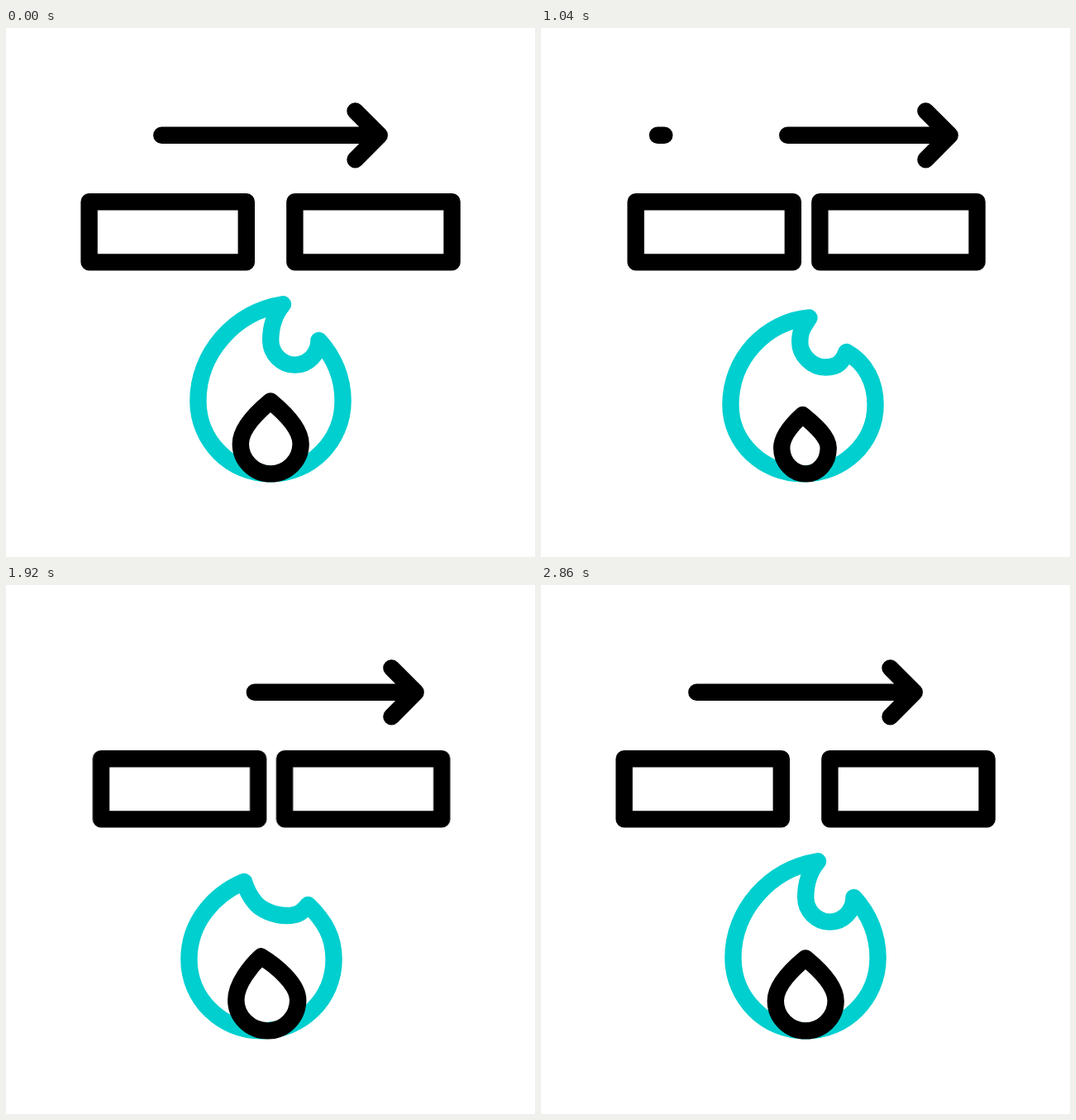
Write an HTML page that moves like this. It is 640 px wide and 640 px high and loops after 3600 ms.

```html
<!DOCTYPE html>
<html lang="en">
<head>
<meta charset="utf-8">
<title>Heat expansion</title>
<style>
  html, body { margin: 0; width: 100%; height: 100%; overflow: hidden; background: #fff; }
  svg { display: block; width: 100vw; height: 100vh; }
  svg * {
    fill: none; stroke: #000; stroke-width: 20.4;
    stroke-linecap: round; stroke-linejoin: round;
  }
  #flame { stroke: #00cfcf; }

  .left, .right, .arrow { animation: 3.6s cubic-bezier(.333, 0, .667, 1) infinite; }
  .left { --shift: 18px; animation-name: slide; }
  .right { --shift: -15.5px; animation-name: slide; }
  .arrow { animation-name: shorten; }
  .dashes { stroke-dasharray: 19 48 19 1000; animation: dashes 3.6s linear infinite; }

  @keyframes slide {
    0%, 11.11%, 79.44%, 100% { transform: none; }
    36.67%, 42.78% { transform: translateX(var(--shift)); }
  }
  @keyframes shorten {
    0%, 11.11%, 79.44%, 100% {
      d: path("M188.3 129.8 L451.8 129.8 M422.5 100.4 L451.8 129.8 L422.5 159.2");
    }
    36.67%, 42.78% {
      d: path("M329.3 129.8 L506.8 129.8 M477.5 100.4 L506.8 129.8 L477.5 159.2");
    }
  }
  @keyframes dashes {
    0%, 28.33% { stroke-dashoffset: 88; }
    42.35%, 100% { stroke-dashoffset: -158; }
  }
</style>
</head>
<body>
<svg viewBox="0 0 640 640">
  <path class="dashes" d="M141 129.8H297"/>
  <path class="arrow" d="M188.3 129.8 L451.8 129.8 M422.5 100.4 L451.8 129.8 L422.5 159.2"/>
  <rect class="left" x="100.6" y="210.2" width="190.2" height="73.2"/>
  <rect class="right" x="349.4" y="210.2" width="190.2" height="73.2"/>
  <path id="flame"/>
  <path id="drop"/>
</svg>
<script>
  const LOOP = 3600, BASE = 539.4, ROUND = 0.552;

  // Closed path from a start point and rows of cubic control points.
  const closed = (start, ...curves) =>
    `path("M${start} ${curves.map(c => 'C' + c.map(n => +n.toFixed(2)).join(' ')).join(' ')} Z")`;

  // Round body on the base line, a pointed tip and a bite between tip and cusp.
  function flame({ cx, cy, rise, tip, lean, cusp, back, bite, low, h, side, slope, neck }) {
    const r = 87.6, l = cx - r, e = cx + r, k = r * ROUND, [sx, sy] = slope;
    return closed(tip,
      [...lean, l, cy - rise, l, cy],
      [l, cy + (BASE - cy) * ROUND, cx - k, BASE, cx, BASE],
      [cx + k, BASE, e, cy + (BASE - cy) * ROUND, e, cy],
      [e, cy - 27, ...back, ...cusp],
      [...bite, low[0] + h, low[1], ...low],
      [low[0] - h, low[1], side[0] + sx, side[1] + sy, ...side],
      [side[0] - sx, side[1] - sy, ...neck, ...tip]);
  }

  // Tip, shoulder handles (lx, rx at hy), left and right extremes at cy, foot x.
  function drop([tx, ty, lx, rx, hy, l, r, cy, foot]) {
    const up = cy - (cy - ty) * 0.37, down = cy + (BASE - cy) * ROUND;
    return closed([tx, ty],
      [rx, hy, r, up, r, cy],
      [r, down, foot + (r - foot) * ROUND, BASE, foot, BASE],
      [foot - (foot - l) * ROUND, BASE, l, down, l, cy],
      [l, up, lx, hy, tx, ty]);
  }

  const rest = {
    flame: { cx: 320, cy: 451, rise: 56, tip: [335, 334.3], lean: [275, 344],
      cusp: [378.5, 378], back: [397, 398], bite: [378.5, 394], low: [349.5, 407.6], h: 16,
      side: [320.2, 378], slope: [0, 16], neck: [325, 346] },
    drop: [320, 451.5, 306, 334, 463, 283.8, 356.6, 503, 320.2]
  };
  const right = {
    flame: { cx: 331, cy: 455, rise: 56, tip: [365.5, 333.5], lean: [300, 340],
      cusp: [402, 407.5], back: [411, 414], bite: [400, 406], low: [392, 407], h: 12,
      side: [361.8, 368], slope: [0, 20], neck: [364, 345] },
    drop: [332, 448, 317, 342, 459.5, 293.8, 358.2, 500, 326]
  };
  const low = {
    flame: { cx: 317, cy: 456, rise: 56, tip: [324.5, 350.5], lean: [272, 355],
      cusp: [369.5, 392], back: [393, 405], bite: [365, 403], low: [344, 410.5], h: 16,
      side: [313.2, 380], slope: [0, 16], neck: [319, 360] },
    drop: [316.5, 468, 306, 328, 477.5, 291.2, 347.7, 508, 321]
  };
  const deep = {
    flame: { ...low.flame, bite: [364, 412], low: [338, 425.8],
      side: [309.2, 394], slope: [0, 17], neck: [316, 368] },
    drop: low.drop
  };
  const left = {
    flame: { cx: 309, cy: 453, rise: 45, tip: [288, 359], lean: [252, 374],
      cusp: [365.5, 387], back: [386, 407], bite: [360, 393], low: [340, 400], h: 16,
      side: [302, 385], slope: [7, 8], neck: [291, 369] },
    drop: [308.5, 449.5, 297, 326, 460, 278.3, 353.2, 502, 317]
  };
  const tilt = {
    flame: { cx: 326, cy: 458, rise: 58, tip: [342, 352.5], lean: [283, 353],
      cusp: [387.5, 400], back: [403, 413], bite: [377, 407], low: [360, 408.5], h: 14,
      side: [333.2, 380], slope: [0, 15], neck: [337, 361] },
    drop: [323.5, 468, 311, 334, 477.5, 294.8, 350.8, 508, 323]
  };

  const steps = [[0, rest], [400, rest], [700, right], [1040, low], [1360, deep],
    [1920, left], [2260, tilt], [2860, rest], [LOOP, rest]];

  for (const [id, shape] of Object.entries({ flame, drop })) {
    const frames = steps.map(([ms, pose]) => ({
      d: shape(pose[id]), offset: ms / LOOP, easing: 'cubic-bezier(.333, 0, .667, 1)'
    }));
    document.getElementById(id).animate(frames, { duration: LOOP, iterations: Infinity });
  }
</script>
</body>
</html>
```
